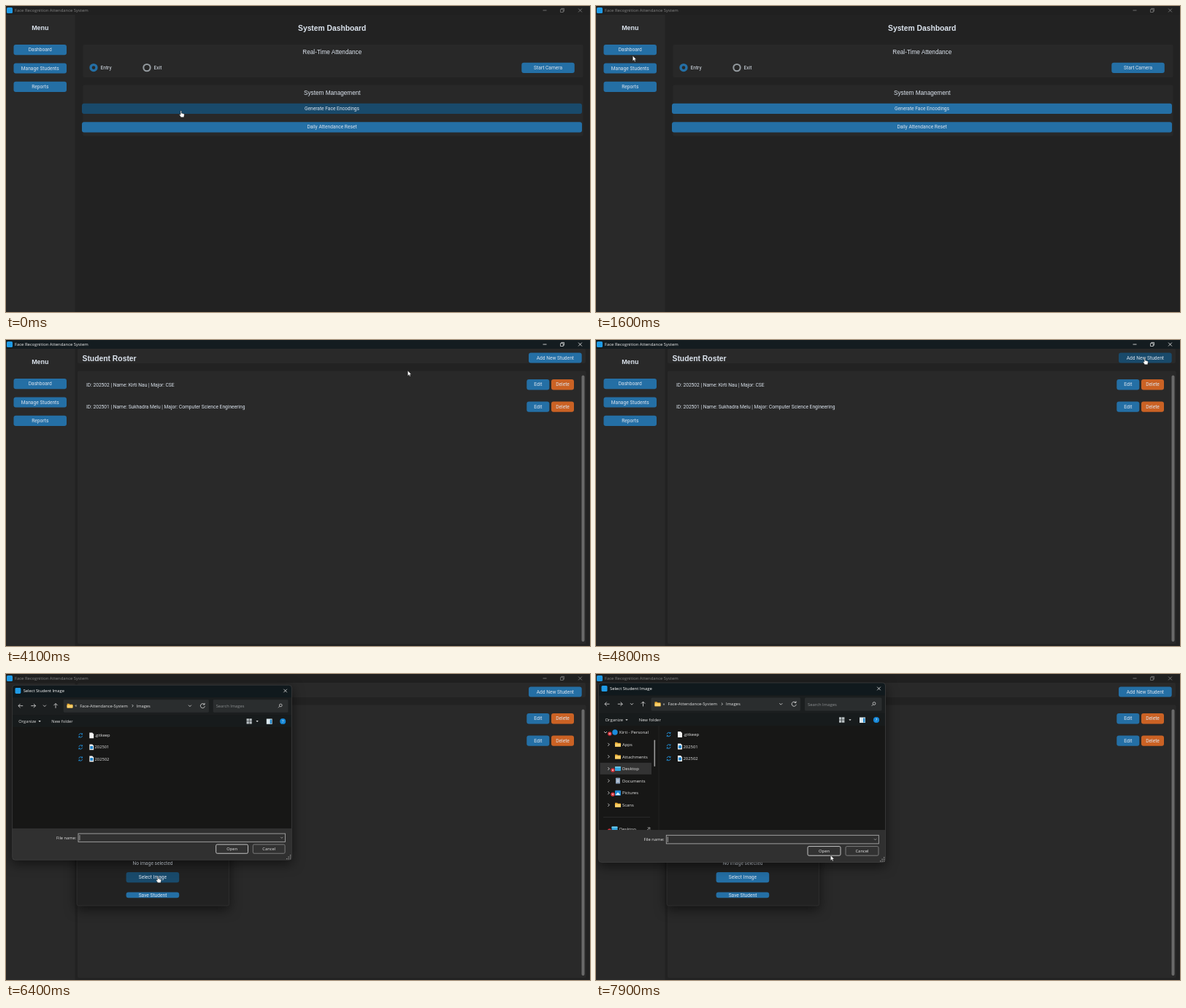
Animation of 800 by 420 pixels, one loop 8000 ms. Source, as an HTML page:

```html
<!DOCTYPE html>
<html lang="en">
<head>
<meta charset="utf-8">
<title>Attendance dashboard</title>
<style>
html, body { margin: 0; width: 100%; height: 100%; overflow: hidden; background: #222; }
svg { display: block; width: 800px; height: 420px; }
.ui { font-family: Roboto, sans-serif; }
.head { font-family: "Liberation Sans", Arial, sans-serif; }
.bold { font-family: "Liberation Sans", Arial, sans-serif; font-weight: 700; }
.sys { font-family: "Open Sans", sans-serif; }
.shadow { filter: drop-shadow(0 5px 8px rgba(0, 0, 0, .55)); }
</style>
</head>
<body>
<svg id="stage" viewBox="0 0 800 420" xmlns="http://www.w3.org/2000/svg"></svg>
<script>
const LOOP = 8000, STEP = 100;
const BLUE = '#246fa5', BLUE_HOVER = '#194a6b', ORANGE = '#cb6224', ORANGE_HOVER = '#9c4a1a';
const PANEL = '#292929', BACK = '#222', INK = '#dce4ee', PALE = '#e4e4e4', APP = '#1f9be6';
const stage = document.getElementById('stage');

const rect = (x, y, w, h, fill, r = 0, extra = '') =>
  `<rect x="${x}" y="${y}" width="${w}" height="${h}" rx="${r}" fill="${fill}" ${extra}/>`;
const circle = (x, y, r, fill, extra = '') => `<circle cx="${x}" cy="${y}" r="${r}" fill="${fill}" ${extra}/>`;
const line = (d, color = PALE, w = .8, extra = '') =>
  `<path d="${d}" fill="none" stroke="${color}" stroke-width="${w}" ${extra}/>`;
// Text is placed by the vertical middle of its capitals.
const text = (x, cy, s, size, cls = 'ui', fill = INK, anchor = 'start') =>
  `<text x="${x}" y="${cy + size * .36}" font-size="${size}" class="${cls}" fill="${fill}" text-anchor="${anchor}">${s}</text>`;
const mid = (x, cy, s, size, cls, fill) => text(x, cy, s, size, cls, fill, 'middle');
const group = (id, body, extra = '') => `<g id="${id}" ${extra}>${body}</g>`;

const buttons = [];
function button(scene, x, y, w, h, label, color = BLUE, hover = BLUE_HOVER) {
  const id = 'button' + buttons.length;
  buttons.push({ id, scene, x, y, w, h, color, hover });
  return rect(x, y, w, h, color, 3, `id="${id}"`) + mid(x + w / 2, y + h / 2 - .2, label, 6.65);
}

const chevron = (x, y, dir, color = PALE, s = 2) => line({
  down: `M${x - s} ${y - s / 2}l${s} ${s} ${s} ${-s}`,
  right: `M${x - s / 2} ${y - s}l${s} ${s} ${-s} ${s}`
}[dir], color);
const caret = (x, y) => `<path d="M${x - 1.7} ${y - .8}h3.4l-1.7 1.9z" fill="${PALE}"/>`;
const closeMark = (x, y, s, color) => line(`M${x - s} ${y - s}l${2 * s} ${2 * s}m0 ${-2 * s}l${-2 * s} ${2 * s}`, color);
const appMark = (x, y) => rect(x - 4, y - 4, 8, 8, APP, 1.5);
const folder = (x, y) =>
  `<path d="M${x - 4} ${y - 3}h3l1 1h4v5h-8z" fill="#e9a92f"/>` + rect(x - 4, y - 1, 8, 4, '#f8d06b', .5);
const badge = (x, y) => circle(x, y, 2.7, '#d5303a') + line(`M${x - 1} ${y - 1}l2 2m0-2l-2 2`, '#fff', .6);

function mainBar() {
  return rect(0, 0, 800, 12, '#202020', 0, 'id="bar"') + appMark(5, 6) +
    group('barInk',
      `<text x="12" y="8.2" font-size="5.9" class="sys" fill="currentColor">Face Recognition Attendance System</text>` +
      line('M735.5 6h5', 'currentColor') +
      line('M759.5 4.7h3.8v3.8h-3.8zM760.8 4.5v-1.1h3.8v3.8h-1.2', 'currentColor', .7) +
      closeMark(786.5, 6, 2.4, 'currentColor'));
}

function menu() {
  return rect(0, 12, 94.5, 408, PANEL) + mid(46.8, 29.8, 'Menu', 8.95, 'bold') +
    ['Dashboard', 'Manage Students', 'Reports']
      .map((s, i) => button('menu', 10.5, 53 + i * 25.4, 72.5, 14.2, s)).join('');
}

function dashboard() {
  return mid(446.7, 29.8, 'System Dashboard', 10.3, 'bold') +
    rect(105.5, 53, 685, 45, '#282828', 2) + mid(446.8, 63, 'Real-Time Attendance', 8.22, 'head') +
    circle(120, 84.6, 4, 'none', `stroke="${BLUE}" stroke-width="3.3"`) + text(129.5, 84.8, 'Entry', 6.65) +
    circle(193, 84.6, 4.7, 'none', 'stroke="#949a9f" stroke-width="2"') + text(202.5, 84.8, 'Exit', 6.65) +
    button('dash', 706.3, 77.8, 72.5, 14.2, 'Start Camera') +
    rect(105.5, 108.5, 685, 70, '#282828', 2) + mid(446.8, 118.8, 'System Management', 8.22, 'head') +
    button('dash', 104, 133.8, 685, 14.2, 'Generate Face Encodings') +
    button('dash', 104, 159.2, 685, 14.2, 'Daily Attendance Reset');
}

function roster() {
  const row = (y, s) => text(110, y + .2, s, 6.65) +
    button('roster', 713.3, y - 7.2, 31, 14.4, 'Edit') +
    button('roster', 747, y - 7.2, 31, 14.4, 'Delete', ORANGE, ORANGE_HOVER);
  return rect(98, 12, 696, 20, PANEL, 2) + text(104.5, 24.8, 'Student Roster', 10.35, 'bold') +
    button('roster', 716, 17.4, 72.7, 14.2, 'Add New Student') +
    rect(98, 42.5, 696.5, 374.5, PANEL, 2) + rect(788.5, 48.5, 4, 365.5, '#696969', 2) +
    row(61.2, 'ID: 202502 | Name: Kirti Nau | Major: CSE') +
    row(91.6, 'ID: 202501 | Name: Sukhadra Melu | Major: Computer Science Engineering');
}

function studentForm() {
  const fields = ['Student ID', 'Full Name', 'Major', 'Year (e.g., 1, 2, 3)', 'Section'];
  return rect(97, 94, 208.5, 224, BACK, 2.5, 'stroke="#343434" stroke-width=".7"') +
    `<path d="M97 109V96.5a2.5 2.5 0 0 1 2.5-2.5h203.5a2.5 2.5 0 0 1 2.5 2.5V109z" fill="#f0f1f0"/>` +
    appMark(105, 101.5) + text(112, 101.6, 'Add New Student', 5.9, 'sys', '#8a8a8a') +
    closeMark(296.5, 101.3, 2.3, '#777') +
    mid(201, 124.8, 'Enter Student Details', 8.9, 'head') +
    fields.map((s, i) => {
      const y = 143.4 + i * 22.1;
      return rect(107.7, y, 187.2, 13.6, '#343638', 2.5, 'stroke="#64696c" stroke-width=".9"') +
        text(111.3, y + 6.8, s, 6.65, 'ui', '#a0a3a5');
    }).join('') +
    mid(201, 259.9, 'No image selected', 6.65) +
    button('form', 164.6, 272, 72.6, 14.2, 'Select Image') +
    rect(164.6, 299.6, 72.6, 7.6, BLUE, 3) + mid(201, 303.3, 'Save Student', 6.65);
}

function fileWindow() {
  const sys = (x, y, s, fill = PALE) => text(x, y, s, 5.9, 'sys', fill);
  const page = (x, y) => `<path d="M${x - 3} ${y - 4}h4l2 2v6h-6z" fill="#f2f2f2"/>`;
  const sync = y => line(`M97.2 ${y - .5}a2.6 2.6 0 0 1 4.8-1v-1.6m0 1.6h-1.6M102 ${y + .5}a2.6 2.6 0 0 1-4.8 1v1.6m0-1.6h1.6`, '#2392dc', .9);
  const icons = {
    folder,
    desktop: (x, y) => rect(x - 4, y - 3, 8, 6, '#35a6dd', .7) + rect(x - 4, y - 3, 8, 1.6, '#74d0f0', .5),
    paper: (x, y) => rect(x - 3, y - 4, 6, 8, '#8fa4bd', .7) + line(`M${x - 1.5} ${y - 1}h3m-3 2h3`, '#fff', .7),
    picture: (x, y) => rect(x - 4, y - 3.5, 8, 7, '#2088d4', .8) + `<path d="M${x - 3.5} ${y + 3}l3.5-4 3.5 4z" fill="#d5efff"/>`
  };
  const places = [['Apps', 'folder'], ['Attachments', 'folder'], ['Desktop', 'desktop', 1],
    ['Documents', 'paper'], ['Pictures', 'picture', 1], ['Scans', 'folder']];
  const tree = rect(5.5, 121.8, 70.5, 16, '#333') + chevron(13, 80, 'down') +
    circle(26, 80, 3.7, '#1b8bdc') + badge(18.8, 82) + sys(32, 80, 'Kirti - Personal') +
    places.map(([name, icon, marked], i) => {
      const y = 96.8 + i * 16.6;
      return chevron(17.3, y, 'right') + icons[icon](30, y) + (marked ? badge(23, y + 2) : '') + sys(36, y, name);
    }).join('') +
    line('M10 196.5h64', '#353535', .6) + icons.desktop(25.5, 212.5) + badge(18.5, 215) + sys(32, 213, 'Desktop') +
    line('M70 214.5l2-2m-1-2l3 3m-1.5-3.5l2 2', '#bbb', 1) +
    rect(79.5, 90.5, 1.6, 36.5, '#999', .8) + line('M86 71v143', '#2a2a2a', .6);
  const files = ['.gitkeep', '202501', '202502'].map((s, i) => {
    const y = 83 + i * 16.5;
    return sync(y) + page(115, y) + (i ? rect(113, y - 1.5, 4, 4, '#2487cf') : '') + sys(119.5, y, s);
  }).join('');
  const choice = (x, s, edge) => rect(x, 236.6, 45, 12.6, '#323232', 1.8, `stroke="${edge}" stroke-width=".9"`) + mid(x + 22.5, 243, s, 5.9, 'sys', PALE);
  return `<clipPath id="frame">${rect(3.5, 12, 393, 246.5, '#000', 4)}</clipPath>` +
    `<clipPath id="list">${rect(3.5, 71, 393, 143, '#000')}</clipPath><g clip-path="url(#frame)">` +
    rect(3.5, 12, 393, 246.5, '#171716') + rect(3.5, 12, 393, 17.5, '#10191d') +
    rect(3.5, 29.5, 393, 25, '#1b1e1f') + rect(3.5, 54.5, 393, 16.5, '#171b1c') +
    rect(3.5, 214, 393, 44.5, '#303030') +
    appMark(11.5, 20) + sys(19, 20.3, 'Select Student Image', '#fff') + closeMark(387.5, 20, 2.3, PALE) +
    line('M18.5 41.2h-6.4m2.6-2.7l-2.7 2.7 2.7 2.7M29.8 41.2h6.4m-2.6-2.7l2.7 2.7-2.7 2.7M64.5 44.5v-6.4m-2.7 2.6l2.7-2.7 2.7 2.7') +
    chevron(49, 41.2, 'down') +
    rect(75.5, 32.5, 204.5, 18, '#2a2d2e', 1.5) + rect(286, 32.5, 105.5, 18, '#2a2d2e', 1.5) +
    folder(84.5, 41.2) + sys(91.5, 40.8, '«') + sys(98.5, 41.2, 'Face-Attendance-System') +
    chevron(172.7, 41.2, 'right', PALE, 1.6) + sys(178, 41.2, 'Images') + chevron(253.3, 41.2, 'down') +
    line('M273.6 39.2a3.1 3.1 0 1 0 .7 2.6M274 37.3v2.2h-2.2') +
    sys(290, 41.4, 'Search Images', '#8b8e90') +
    circle(381, 40.5, 1.9, 'none', `stroke="${PALE}" stroke-width=".7"`) + line('M379.6 41.9l-2 2', PALE, .7) +
    sys(12.5, 63.2, 'Organize') + caret(42, 63) + sys(58.7, 63.2, 'New folder') +
    [0, 1, 2, 3].map(i => rect(333 + (i % 2) * 4, 59.3 + (i >> 1) * 4, 3.4, 3.4, '#b9c0c3')).join('') + caret(348, 63) +
    rect(361, 59.5, 8, 7.5, '#dce9ef') + rect(366, 60.5, 2.5, 6, '#2489cc') +
    circle(384, 63, 4.1, '#1688d8') + mid(384, 63, '?', 5.9, 'sys', '#fff') +
    `<g clip-path="url(#list)">${group('tree', tree)}${files}</g>` +
    sys(65.5, 227, 'File name:') +
    rect(96.3, 221.3, 291, 11.6, '#303030', 0, 'stroke="#aaa" stroke-width=".9"') +
    line('M98.3 223.3v7.6', '#eee', .6) + chevron(382.5, 227, 'down', '#aaa', 1.6) +
    choice(290, 'Open', '#d6d6d6') + choice(342, 'Cancel', '#858585') +
    [[394, 252], [394, 254.5], [391.5, 254.5], [394, 257], [391.5, 257], [389, 257]]
      .map(([x, y]) => rect(x, y - .8, 1.3, 1.3, '#999')).join('') + '</g>' +
    rect(3.5, 12, 393, 246.5, 'none', 4, 'stroke="#444" stroke-width=".7"');
}

const arrow = '<path d="M0 0V7.2L1.7 5.7 2.8 8.1 3.9 7.6 2.9 5.3H5z" fill="#fff" stroke="#111" stroke-width=".4"/>';
const hand = '<path d="M-.9.3C-.9-.5.4-.5.4.3V3.1L3.5 3.9C4.3 4.2 4.4 4.8 4.2 5.7L3.6 8.7H-.3L-2.4 5.6C-2.9 4.7-1.8 4.3-.9 5.2z" fill="#fff" stroke="#111" stroke-width=".4"/>';

stage.innerHTML = rect(0, 0, 800, 420, BACK) + menu() + group('dash', dashboard()) + group('roster', roster()) +
  mainBar() + group('form', studentForm(), 'class="shadow"') + group('file', fileWindow(), 'class="shadow"') +
  group('cursor', group('arrow', arrow) + group('hand', hand));

const el = id => document.getElementById(id);
const show = (id, on) => { el(id).style.display = on ? '' : 'none'; };

// Pointer stops: time, x, y.
const path = [[0, 240, 144], [800, 240, 144], [1500, 50.3, 68.3], [2000, 50.3, 68.3], [2400, 55, 89.7],
  [3400, 55, 89.7], [4100, 550.3, 42], [4500, 752, 25], [5100, 752, 25], [5600, 316, 179.2],
  [6000, 208.3, 277.8], [7100, 208.3, 277.8], [7700, 321.3, 248.8], [LOOP, 321.3, 248.8]];

function pointer(t) {
  const i = path.findIndex(p => p[0] > t);
  const [t0, x0, y0] = path[i - 1], [t1, x1, y1] = path[i];
  const k = (t - t0) / (t1 - t0), e = k * k * (3 - 2 * k);
  return [x0 + (x1 - x0) * e, y0 + (y1 - y0) * e];
}

function draw(t) {
  const open = { menu: true, dash: t < 3400, roster: t >= 3400, form: t >= 5200, file: t >= 6300 };
  for (const id of ['dash', 'roster', 'form', 'file']) show(id, open[id]);
  show('tree', t >= 6700);

  const active = t >= 2400 && t < 6200;
  el('bar').setAttribute('fill', active ? '#141c20' : '#202020');
  el('barInk').style.color = active ? '#f0f0f0' : '#858585';

  const scale = t < 6400 ? .94 : t < 6500 ? .974 : 1;
  el('file').setAttribute('transform', `translate(${200 - 200 * scale} ${135.2 - 135.2 * scale}) scale(${scale})`);
  el('file').setAttribute('opacity', t < 6400 ? .5 : 1);

  const [x, y] = pointer(t);
  let over = false;
  for (const b of buttons) {
    const hit = open[b.scene] && x >= b.x && x <= b.x + b.w && y >= b.y && y <= b.y + b.h;
    el(b.id).setAttribute('fill', hit ? b.hover : b.color);
    over = over || hit;
  }
  show('hand', over);
  show('arrow', !over);
  el('cursor').setAttribute('transform', `translate(${x} ${y})`);
}

const start = performance.now();
function tick() {
  const t = (performance.now() - start) % LOOP;
  draw(Math.floor(t / STEP) * STEP);
  requestAnimationFrame(tick);
}
tick();
</script>
</body>
</html>
```
